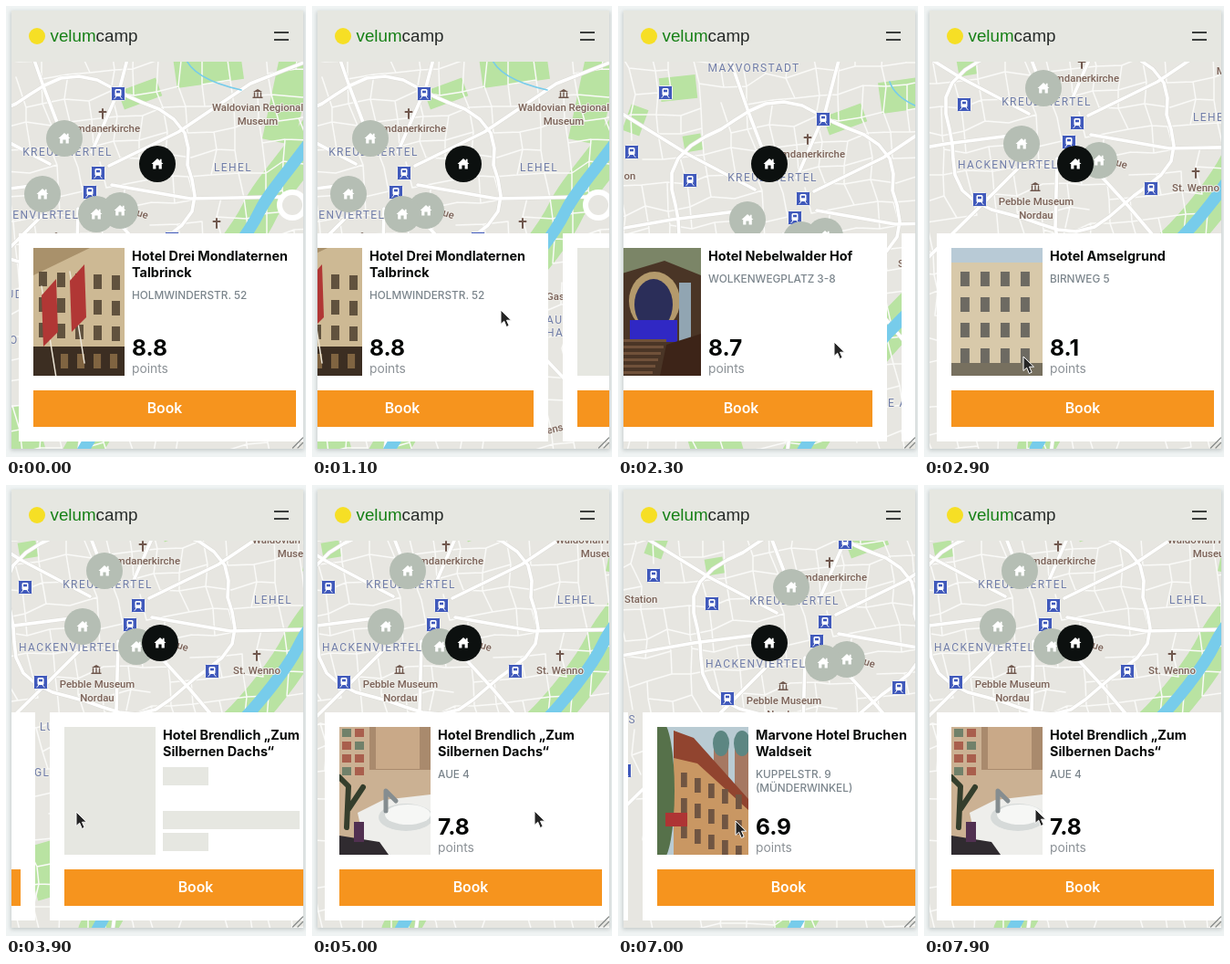
Write an HTML page that moves like this. It is 329x494 px and loops after 8000 ms.

```html
<!DOCTYPE html>
<html lang="en">
<head>
<meta charset="utf-8">
<title>Hotel cards on a map</title>
<style>
html, body { margin: 0; width: 100%; height: 100%; overflow: hidden; background: #eff3f3; }
svg { display: block; width: 329px; height: 494px; }
text { font-family: Inter, sans-serif; }
.logo { font: 18.8px "Liberation Sans", Arial, sans-serif; fill: #262a28; }
.title { font-size: 14.4px; font-weight: 700; fill: #090b0a; }
.addr { font-size: 11.8px; font-weight: 500; fill: #7b858c; }
.score { font-size: 24.5px; font-weight: 700; fill: #050706; }
.points { font-size: 13.8px; fill: #8b9196; }
.book { font-size: 15.8px; font-weight: 600; fill: #fff; text-anchor: middle; }
.area, .poi { font-family: Roboto, sans-serif; paint-order: stroke; stroke: #eeede8; stroke-width: 2px; }
.area { font-size: 12px; letter-spacing: 1.4px; fill: #707da8; }
.poi { font-size: 11.4px; font-weight: 500; fill: #7b6258; }
</style>
</head>
<body>
<svg id="stage" viewBox="0 0 329 494" xmlns="http://www.w3.org/2000/svg"></svg>
<script>
const LOOP = 8000, STEP = 100, PITCH = 336;
const el = id => document.getElementById(id);
const all = selector => [...document.querySelectorAll(selector)];

const rect = (x, y, w, h, fill) => `<rect x="${x}" y="${y}" width="${w}" height="${h}" fill="${fill}"/>`;
const oval = (x, y, rx, ry, fill) => `<ellipse cx="${x}" cy="${y}" rx="${rx}" ry="${ry}" fill="${fill}"/>`;
const poly = (points, fill) => `<polygon points="${points}" fill="${fill}"/>`;
const line = (d, color, w) => `<path d="${d}" fill="none" stroke="${color}" stroke-width="${w}" stroke-linejoin="round" stroke-linecap="round"/>`;
const text = (x, y, cls, s, anchor = 'start') => `<text x="${x}" y="${y}" class="${cls}" text-anchor="${anchor}">${s}</text>`;
const repeat = (n, fn) => Array.from({ length: n }, (_, i) => fn(i)).join('');

function random(seed) {
  return () => (seed = (seed * 16807) % 2147483647) / 2147483647;
}

// ---- photos, 100 x 140 each
const windows = (x, y, cols, rows, gap, fill, slope = 0) => repeat(cols * rows, i => {
  const c = i % cols, r = Math.floor(i / cols);
  return rect(x + c * gap, y + r * 28 + c * slope, gap * 0.45, 16, fill);
});
const flag = (x, y) => line(`M${x + 16} ${y + 100}L${x} ${y}`, '#eee7d8', 1.5) +
  `<path d="M${x} ${y + 10}l16 -18 2 58 -16 16z" fill="#b13735"/>`;

const photos = {
  flags: rect(0, 0, 100, 140, '#cdb994') + poly('0,0 62,0 0,30', '#a9916b') +
    windows(6, 26, 5, 3, 20, '#61523e', 1) + rect(0, 108, 100, 32, '#3c2e22') +
    windows(30, 116, 4, 1, 18, '#806441') + flag(9, 42) + flag(40, 26),
  hall: rect(0, 0, 100, 140, '#4a3526') + poly('0,0 100,0 100,30 60,14 0,32', '#7b8567') +
    oval(49, 58, 28, 32, '#b49a6c') + oval(48, 62, 21, 28, '#2b2e59') + rect(22, 79, 52, 24, '#3028c4') +
    rect(76, 38, 13, 64, '#91a5b2') +
    repeat(6, i => rect(0, 100 + i * 7, 62 - i * 3, 3, '#70513a')) + poly('62,106 100,94 100,140 55,140', '#3d2418'),
  front: rect(0, 0, 100, 140, '#d8c9aa') + rect(0, 0, 100, 16, '#b8cad6') +
    windows(10, 26, 4, 4, 22, '#6d6a62') + rect(0, 126, 100, 14, '#77705f'),
  bath: rect(0, 0, 100, 140, '#cbb193') + rect(33, 0, 67, 47, '#a98a6d') + rect(40, 0, 48, 46, '#c9a988') +
    repeat(8, i => rect(3 + i % 2 * 14, 2 + (i >> 1) * 14, 10, 9, i % 3 ? '#a95f4d' : '#71816a')) +
    poly('20,94 48,80 100,74 100,140 30,140', '#eeeeeb') +
    oval(73, 99, 30, 15, '#d6dad9') + oval(75, 96, 25, 11, '#f6f7f5') +
    line('M51 92V70L62 81', '#858d90', 5) + line('M8 110L10 65L0 55M10 90L26 66', '#343e2c', 6) +
    poly('0,119 44,126 54,140 0,140', '#302b30') + rect(16, 104, 11, 22, '#513051'),
  domes: rect(0, 0, 100, 140, '#b9cbd3') +
    [70, 93].map(x => rect(x - 8, 20, 16, 60, '#a67862') + oval(x, 18, 9, 14, '#5c8682')).join('') +
    poly('18,4 38,14 100,83 100,140 18,140', '#c99763') + poly('18,4 40,12 100,79 100,91 44,40 18,34', '#91442f') +
    windows(26, 50, 5, 3, 15, '#705542', 6) + oval(5, 70, 14, 76, '#56714a') + rect(9, 94, 24, 15, '#ae3434')
};

const cards = [
  { pos: [166, 173], title: ['Hotel Drei Mondlaternen', 'Talbrinck'], addr: ['HOLMWINDERSTR. 52'], score: '8.8', photo: 'flags' },
  { pos: [64, 145], title: ['Hotel Nebelwalder Hof'], addr: ['WOLKENWEGPLATZ 3-8'], score: '8.7', photo: 'hall' },
  { pos: [99, 228], title: ['Hotel Amselgrund'], addr: ['BIRNWEG 5'], score: '8.1', photo: 'front' },
  { pos: [125, 224], title: ['Hotel Brendlich „Zum', 'Silbernen Dachs“'], addr: ['AUE 4'], score: '7.8', photo: 'bath' },
  { pos: [40, 206], title: ['Marvone Hotel Bruchen', 'Waldseit'], addr: ['KUPPELSTR. 9', '(MÜNDERWINKEL)'], score: '6.9', photo: 'domes' }
];

function cardMarkup(c, i) {
  const addrY = 36 + c.title.length * 18, grey = '#e6e7e1';
  return `<g transform="translate(${14 + i * PITCH} 249)">` +
    rect(0, 0, 320, 228, '#fff') + rect(16, 172, 288, 40, '#f6941e') + text(160, 197, 'book', 'Book') +
    c.title.map((s, n) => text(124, 30 + n * 18, 'title', s)).join('') +
    `<g class="empty">${rect(16, 16, 100, 140, grey) + rect(124, addrY - 12, 50, 20, grey) +
      rect(124, 108, 150, 20, grey) + rect(124, 132, 50, 20, grey)}</g>` +
    `<g class="full"><svg x="16" y="16" width="100" height="140" viewBox="0 0 100 140">${photos[c.photo]}</svg>` +
    c.addr.map((s, n) => text(124, addrY + n * 15, 'addr', s)).join('') +
    text(124, 134, 'score', c.score) + text(124, 153, 'points', 'points') + '</g></g>';
}

// ---- map
function streets() {
  const rnd = random(77), cell = 25, cols = 21, rows = 23;
  const grid = Array.from({ length: cols * rows }, (_, i) => {
    const c = i % cols, r = Math.floor(i / cols);
    return [-150 + c * cell + r * 3 + rnd() * 11, 20 + r * cell - c * 3 + rnd() * 11].map(Math.round);
  });
  let d = '';
  grid.forEach((p, i) => {
    if ((i + 1) % cols && rnd() < 0.78) d += `M${p}L${grid[i + 1]}`;
    if (i + cols < grid.length && rnd() < 0.78) d += `M${p}L${grid[i + cols]}`;
  });
  return line(d, '#fafaf8', 1.5);
}

// a ring around the old town with bent spokes leading out
function mainRoads() {
  const rnd = random(12), spokes = 9;
  const around = (a, k) => [80 + Math.cos(a) * 124 * k, 190 + Math.sin(a) * 108 * k].map(Math.round);
  let d = 'M' + Array.from({ length: 40 }, (_, i) => around(i * Math.PI / 20, 1 + 0.05 * Math.sin(i * 0.9))).join('L') + 'Z';
  for (let i = 0; i < spokes; i++) {
    const a = 0.2 + i * 2 * Math.PI / spokes;
    d += `M${around(a, 0.3)}L${around(a, 1)} ${around(a + rnd() * 0.2 - 0.1, 1.8)} ${around(a, 3.5)}`;
  }
  return line(d, '#dcdbd6', 4.6) + line(d, '#fff', 3.6);
}

const park = (x, y, w, h, turn) => `<g transform="translate(${x} ${y}) rotate(${turn})">${rect(-w / 2, -h / 2, w, h, '#b9e3a2')}</g>`;
const station = ([x, y]) => `<g transform="translate(${x} ${y})">` +
  '<rect x="-7.5" y="-7.5" width="15" height="15" rx="1" fill="#4059bb" stroke="#f2f2f0"/>' +
  '<rect x="-3.5" y="-5" width="7" height="8" rx="1.5" fill="#fff"/>' + rect(-2, -3.3, 4, 2.6, '#4059bb') +
  line('M-2 3L-4 5.5M2 3L4 5.5', '#fff', 1) + '</g>';
const cross = (x, y) => line(`M${x} ${y - 5}v10M${x - 3.5} ${y - 2}h7`, '#6f574d', 2);
const museum = (x, y) => `<g transform="translate(${x} ${y})">` + poly('-5,-2 0,-5 5,-2', '#6f574d') +
  line('M-3.5 -1V3M0 -1V3M3.5 -1V3M-5 4.3H5', '#6f574d', 1.4) + '</g>';

const river = 'M350 125C320 170 290 200 278 225S235 290 206 318 130 400 55 540';
const stations = [[123, 96], [101, 183], [92, 204], [182, 255], [-23, 163], [-6, 267], [-50, 67], [-87, 132], [-119, 346]];

const mapMarkup = rect(-160, 0, 560, 600, '#e7e6e1') +
  park(222, 68, 74, 34, -8) + park(147, 96, 44, 21, -20) + park(-36, 62, 40, 26, -6) +
  park(-83, 97, 20, 30, 20) + park(-20, 122, 20, 18, -10) + park(308, 105, 36, 90, 12) + park(10, 470, 56, 60, -16) +
  line(river, '#b9e3a2', 40) + streets() + mainRoads() +
  line(river, '#77cceb', 13) + line('M196 55Q204 80 258 92', '#77cceb', 1.6) +
  oval(314, 218, 17, 17, '#fff') + oval(314, 218, 11, 11, '#e7e6e1') +
  stations.map(station).join('') + cross(106, 118) + cross(231, 238) + museum(276, 96) + museum(55, 253) +
  text(67.5, 164, 'area', 'KREUZVIERTEL', 'middle') + text(-30, 233, 'area', 'HACKENVIERTEL') +
  text(249, 181, 'area', 'LEHEL', 'middle') + text(47, 44, 'area', 'MAXVORSTADT', 'middle') +
  text(-7, 320, 'area', 'LUDWIGS') + text(-13, 370, 'area', 'GLOCKEN') + text(-106, 294, 'area', 'VORS', 'end') +
  text(257, 348, 'area', 'AU-') + text(257, 362, 'area', 'HAID') + text(194, 411, 'area', 'E A') +
  text(147, 138, 'poi', 'Blomdanerkirche', 'end') +
  text(276, 115, 'poi', 'Waldovian Regional', 'middle') + text(276, 130, 'poi', 'Museum', 'middle') +
  text(56, 273, 'poi', 'Pebble Museum', 'middle') + text(56, 288, 'poi', 'Nordau', 'middle') +
  text(231, 258, 'poi', 'St. Wenno', 'middle') + text(-119, 162, 'poi', 'Station') + text(257, 322, 'poi', 'Gas') +
  `<g transform="rotate(18 148 228)">${text(136, 231, 'poi', 'Aue')}</g>` +
  `<g transform="rotate(-14 266 463)">${text(257, 467, 'poi', 'ens')}</g>`;

const marker = ({ pos }) => `<g class="pin" transform="translate(${pos})"><circle r="20"/>` +
  '<path d="M-6.5 0L0 -6 2.8 -3.4V-5.2H4.6V-1.8L6.5 0H4.8V5.5H1.6V1.5H-1.6V5.5H-4.8V0Z" fill="#fff"/></g>';

el('stage').innerHTML = `<defs><clipPath id="view">${rect(6, 5, 320, 480, '#000')}</clipPath>
<filter id="soft" x="-5%" y="-5%" width="110%" height="110%"><feGaussianBlur stdDeviation="2.2"/></filter></defs>` +
  rect(0, 0, 329, 494, '#eff3f3') + `<g opacity=".6" filter="url(#soft)">${rect(5, 6, 322, 481, '#a9b0b0')}</g>` +
  `<g clip-path="url(#view)"><g id="map">${mapMarkup}<g id="pins">${cards.map(marker).join('')}</g></g>` +
  `<g id="cards">${cards.map(cardMarkup).join('')}</g>` +
  rect(6, 5, 320, 56, '#e6e7e1') + oval(34, 33, 9, 9, '#f6df25') +
  '<text x="48.5" y="39" class="logo"><tspan fill="#168016">velum</tspan>camp</text>' +
  rect(294, 28, 16, 2, '#3b3e3c') + rect(294, 36, 16, 2, '#3b3e3c') +
  line('M314.5 484L325.5 473M320 484L325.5 478.5', '#868a88', 1.2) + '</g>' +
  '<g id="cursor"><path id="arrow" d="M0 0V15.5L3.7 12.2 6.3 18.5 9.2 17.2 6.5 11.2H11.5Z" fill="#252525" stroke="#fff"/>' +
  '<path id="hand" d="M5 16L1 9Q0 6 4 8V3Q5.5 1 7 3Q8.5 0 10 3Q11.500 1 13 5Q15 4 16 6V11L13.5 16Z" fill="#fff" stroke="#222"/></g>';

const pins = all('.pin'), empties = all('.empty'), fulls = all('.full');

// ---- motion
const swipes = [
  { start: 1000, time: 327, to: 1 },
  { start: 2200, time: 470, to: 2 },
  { start: 3600, time: 374, to: 3 },
  { start: 5000, time: 375, to: 4 },
  { start: 6950, time: 430, to: 3 }
];
const PAN_DELAY = 150, PAN_TIME = 290, LOAD_DELAY = 600;
const BOUNCE = { start: 6200, time: 600, pull: 56 };

// time, x, y: the pointer eases from stop to stop
const stops = [
  [500, 152, 204], [900, 253, 327], [1000, 253, 327], [1278, 98, 346], [1900, 98, 346], [2200, 255, 366],
  [2670, 98, 386], [2800, 98, 386], [3400, 241, 361], [3600, 241, 361], [3900, 77, 358], [4100, 77, 358],
  [4500, 199, 363], [4800, 252, 357], [4950, 252, 357], [5340, 70, 358], [5800, 211, 361], [6100, 269, 353],
  [6200, 269, 353], [6500, 110, 358], [6900, 100, 362], [7300, 285, 400], [7500, 285, 400], [7900, 122, 355]
];

const progress = (t, start, time) => Math.max(0, Math.min(1, (t - start) / time));
const smooth = u => u * u * (3 - 2 * u);
const mix = (a, b, k) => a + (b - a) * k;

function scrollAt(t) {
  let card = 0;
  for (const s of swipes) card = mix(card, s.to, smooth(progress(t, s.start, s.time)));
  return card * PITCH + BOUNCE.pull * Math.sin(Math.PI * progress(t, BOUNCE.start, BOUNCE.time));
}

function shiftAt(t) {
  let shift = [0, 0];
  for (const s of swipes) {
    const k = 1 - (1 - progress(t, s.start + PAN_DELAY, PAN_TIME)) ** 3;
    shift = shift.map((v, i) => mix(v, cards[0].pos[i] - cards[s.to].pos[i], k));
  }
  return shift.map(Math.round);
}

function cursorAt(t) {
  const n = stops.findIndex(s => s[0] >= t);
  if (n < 1) return stops[n ? stops.length - 1 : 0].slice(1);
  const [a, b] = [stops[n - 1], stops[n]];
  const k = smooth(progress(t, a[0], b[0] - a[0]));
  return [1, 2].map(i => Math.round(mix(a[i], b[i], k)));
}

const show = (node, on) => { node.style.display = on ? '' : 'none'; };
const move = (id, x, y) => el(id).setAttribute('transform', `translate(${x} ${y})`);
const byHeight = cards.map((c, i) => i).sort((a, b) => cards[a].pos[1] - cards[b].pos[1]);
let shown = -1;

function setActive(active) {
  if (active === shown) return;
  shown = active;
  [...byHeight.filter(i => i !== active), active].forEach(i => {
    el('pins').appendChild(pins[i]);
    pins[i].firstChild.setAttribute('fill', i === active ? '#0c100f' : '#b5beb4');
  });
  show(pins[0], active === 0);
}

function draw(t) {
  const panned = swipes.filter(s => t > s.start + PAN_DELAY);
  setActive(panned.length ? panned[panned.length - 1].to : 0);
  move('map', ...shiftAt(t));
  move('cards', -Math.round(scrollAt(t)), 0);
  cards.forEach((c, i) => {
    const ready = i === 0 || swipes.some(s => s.to === i && t >= s.start + LOAD_DELAY);
    show(fulls[i], ready);
    show(empties[i], !ready);
  });
  const [x, y] = cursorAt(t);
  move('cursor', x, y);
  show(el('cursor'), t >= 300);
  show(el('hand'), y < 249);
  show(el('arrow'), y >= 249);
}

const begin = performance.now();
function tick() {
  const t = (performance.now() - begin) % LOOP;
  draw(Math.floor(t / STEP) * STEP);
  requestAnimationFrame(tick);
}
tick();
</script>
</body>
</html>
```
